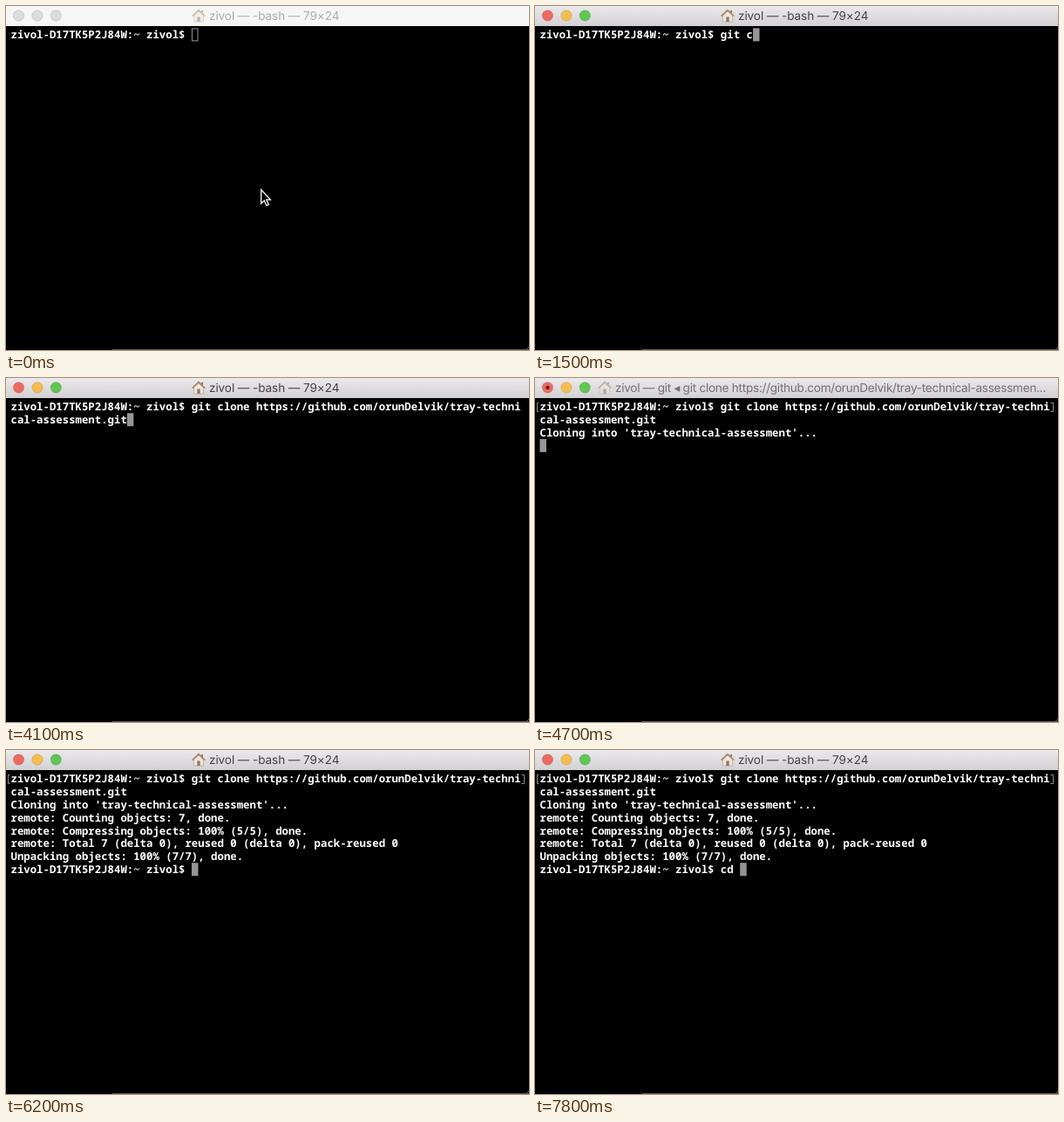
Write an HTML page that moves like this. It is 600 px wide and 394 px high and loops after 8 s.

```html
<!DOCTYPE html>
<html lang="en">
<head>
<meta charset="utf-8">
<title>Terminal</title>
<style>
  html, body { margin: 0; width: 100%; height: 100%; overflow: hidden; background: #000; }
  svg { display: block; }
  text { white-space: pre; text-rendering: geometricPrecision; }
  #title { font: 13.6px Inter, Roboto, sans-serif; letter-spacing: -.1px; }
  #title.tight { letter-spacing: -.27px; }
  #rows { font: 600 12.35px "Noto Sans Mono", "DejaVu Sans Mono", monospace; fill: #fff; }
</style>
</head>
<body>
<svg width="600" height="394" viewBox="0 0 600 394">
  <defs>
    <linearGradient id="bar" x2="0" y2="1">
      <stop stop-color="#ebe9ec"/><stop offset="1" stop-color="#d2d0d3"/>
    </linearGradient>
    <path id="ibeam" d="M289.8 204Q293 204 293 207V217Q293 220 289.8 220M296.2 204Q293 204 293 207M293 217Q293 220 296.2 220M291.5 212H294.5"/>
  </defs>
  <path d="M122 393.5H600M597 393Q599.5 392.5 600 390" fill="none" stroke="#555"/>
  <rect id="head" width="600" height="23"/>
  <g id="lights" stroke="#000" stroke-opacity=".1">
    <circle cx="14.5" cy="11" r="6.2"/>
    <circle cx="36" cy="11" r="6.2"/>
    <circle cx="57.3" cy="11" r="6.2"/>
  </g>
  <circle id="busy" cx="14.5" cy="11" r="2.2" fill="#681712"/>
  <g id="house">
    <path d="M2.5 8V15H13.5V8L8 3Z" fill="#eee7da" stroke="#aca294" stroke-width=".7"/>
    <path d="M11 2h2v4h-2Z" fill="#b0705a"/>
    <path d="M.7 8.6 8 1.6l7.3 7" fill="none" stroke="#a98873" stroke-width="1.7"/>
    <path d="M6.3 15V9.5h3.4V15Z" fill="#8d7867"/>
  </g>
  <text id="title" y="16"></text>
  <g id="rows"></g>
  <path id="wrap" d="M4.5 28.5H2.5V38.5H4.5M591.5 28.5H594.5V38.5H591.5" fill="none" stroke="#8a8a8a"/>
  <rect id="cursor"/>
  <path id="arrow" d="M292.7 210.5V226.2L296.3 222.8 298.9 228.6 301.3 227.5 298.8 221.9H303.4Z"
    fill="#000" stroke="#fff" stroke-width="1.3"/>
  <g id="beam" fill="none" stroke-linecap="round">
    <use href="#ibeam" stroke="#b0b0b0" stroke-width="2.9"/>
    <use href="#ibeam" stroke="#000" stroke-width="1.4"/>
  </g>
</svg>
<script>
const LOOP = 8000, COLS = 79, CELL_W = 7.41, ROW_H = 14.83, LEFT = 5.5;
const ACTIVE = 400, TYPING = 700, ENTER = 4400, GIT_START = 4500, GIT_END = 5400;
const USER = 'zivol', PROMPT = `${USER}-D17TK5P2J84W:~ ${USER}$ `;
const REPO = 'tray-technical-assessment';
const URL_TEXT = `https://github.com/orunDelvik/${REPO}`;

// What reaches the screen, and when
const output = [
  [0, PROMPT], [700, 'g'], [800, 'i'], [900, 't'], [1100, ' '],
  [1500, 'c'], [1700, 'l'], [2000, 'o'], [2300, 'n'], [2500, 'e'], [2900, ' '],
  [3200, URL_TEXT + '.git'], [ENTER, '\n'],
  [GIT_START, `Cloning into '${REPO}'...\n`],
  [5000, 'remote: Counting objects: 7, done.\n' +
    'remote: Compressing objects: 100% (5/5), done.\n' +
    'remote: Total 7 (delta 0), reused 0 (delta 0), pack-reused 0\n'],
  [5100, 'Unpacking objects: 100% (7/7), done.\n'],
  [GIT_END, PROMPT], [6400, 'c'], [7000, 'd'], [7200, ' ']
];

const $ = id => document.getElementById(id);
const set = (el, attrs) => { for (const k in attrs) el.setAttribute(k, attrs[k]); };
const show = (id, on) => set($(id), { visibility: on ? 'visible' : 'hidden' });

const rows = Array.from({ length: 9 }, (_, i) => {
  const row = document.createElementNS('http://www.w3.org/2000/svg', 'text');
  set(row, { x: LEFT, y: 37.3 + i * ROW_H });
  return $('rows').appendChild(row);
});

function drawScreen(t, active) {
  const text = output.filter(([at]) => at <= t).map(([, s]) => s).join('');
  const lines = text.split('\n').flatMap(s => s.match(new RegExp(`.{1,${COLS}}`, 'g')) || ['']);
  rows.forEach((row, i) => row.textContent = lines[i] || '');
  const last = lines.length - 1;
  const x = LEFT + lines[last].length * CELL_W, y = 25.4 + last * ROW_H;
  set($('cursor'), active
    ? { x, y, width: 7.5, height: 15, fill: '#969496', stroke: 'none' }
    : { x: x + .5, y: y + .5, width: 6.5, height: 14, fill: 'none', stroke: '#969496' });
}

function drawBar(t, active) {
  const git = t >= GIT_START && t < GIT_END;
  set($('head'), { fill: active ? 'url(#bar)' : '#f6f6f6' });
  [...$('lights').children].forEach((c, i) =>
    set(c, { fill: active ? ['#ed6a5f', '#f5bd4f', '#61c554'][i] : '#dcdcdc' }));
  show('busy', git);
  set($('house'), {
    transform: `translate(${git ? 72 : 213} 3)`,
    opacity: active && !git ? 1 : .5
  });
  $('title').textContent = git
    ? `${USER} — git ◂ git clone ${URL_TEXT.slice(0, -1)}...`
    : `${USER} — -bash — 79×24`;
  set($('title'), {
    x: git ? 92 : 233,
    fill: git ? '#727072' : active ? '#454345' : '#adadad',
    class: git ? 'tight' : ''
  });
}

function draw(now) {
  const t = now % LOOP, active = t >= ACTIVE;
  drawScreen(t, active);
  drawBar(t, active);
  show('wrap', t >= ENTER);
  show('arrow', !active);
  show('beam', active && t < TYPING);
}

const start = performance.now();
(function frame() {
  draw(performance.now() - start);
  requestAnimationFrame(frame);
})();
</script>
</body>
</html>
```
